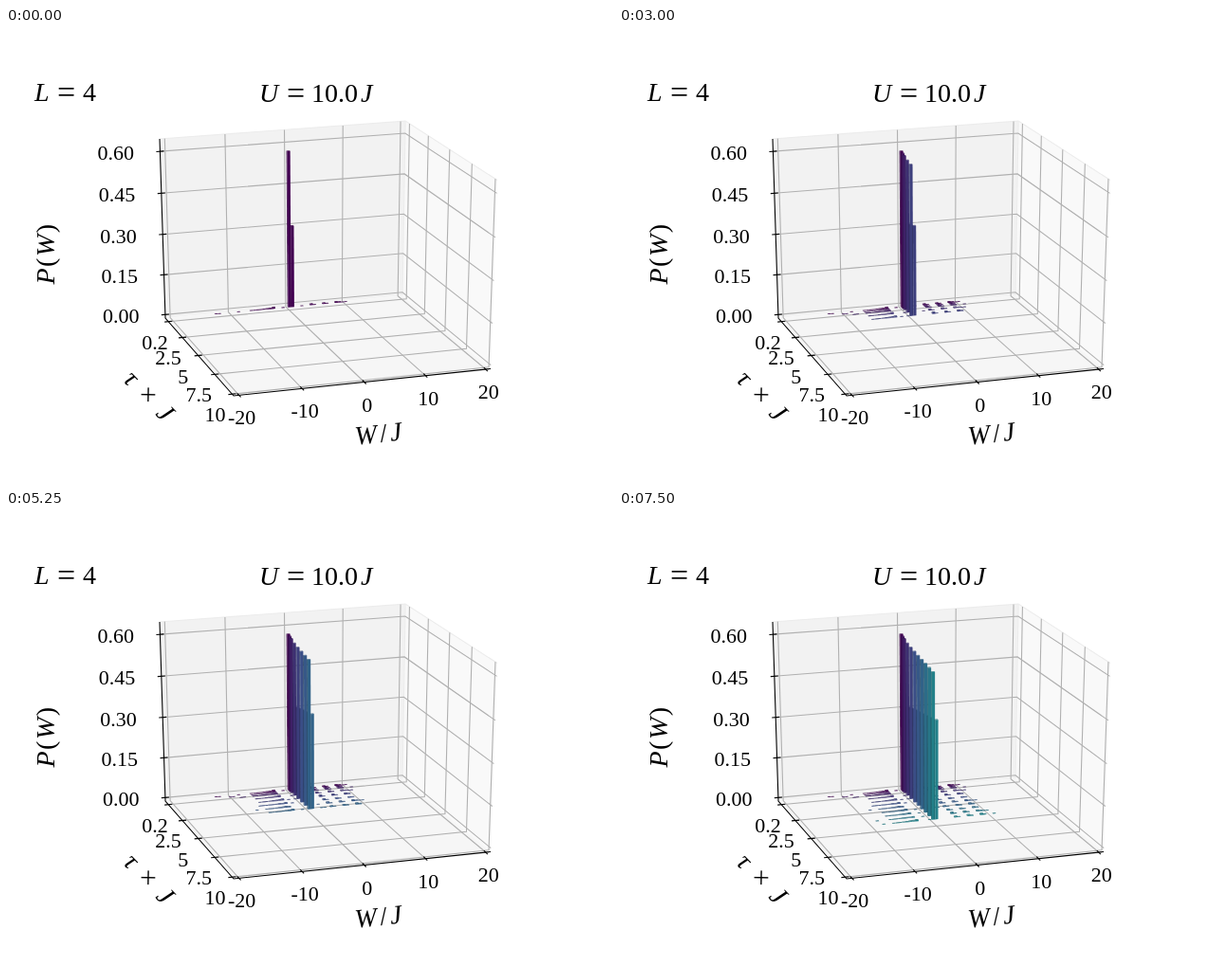
Recreate the animation shown at these times as an HTML page. Size 640x480 px, loop 8000 ms.

```html
<!DOCTYPE html>
<html lang="en">
<head>
<meta charset="utf-8">
<title>Work distribution</title>
<style>
html, body { margin: 0; width: 100%; height: 100%; overflow: hidden; background: #fff; }
svg { display: block; width: 100vw; height: 100vh; }
text { font-family: "Liberation Serif", serif; fill: #000; }
</style>
</head>
<body>
<svg id="stage" viewBox="0 0 640 480"></svg>
<script>
const STEP = 750, LOOP = 8000, ROWS = 11;
const BIN = .55, DEPTH = .1;
const stage = document.getElementById('stage');

// Box corners on screen with their perspective weights: origin, W end, tau end, P end
const CORNERS = [[168, 306, 1], [418, 282.3, 1.03], [240, 388, .912], [162, 117, .9646]];

// Unit box coordinates to screen
function project(u, v, w) {
  let x = 0, y = 0, sum = 0;
  [1 - u - v - w, u, v, w].forEach((part, i) => {
    const [cx, cy, scale] = CORNERS[i], a = part * scale;
    x += a * cx;
    y += a * cy;
    sum += a;
  });
  return [x / sum, y / sum];
}

// Data values to unit box coordinates
const atW = W => .5 + .024 * W;
const atTau = tau => .03 + .095 * tau;
const atP = P => .02 + 1.521 * P;
const plot = (W, tau, P) => project(atW(W), atTau(tau), atP(P));

function add(tag, attrs, parent = stage) {
  const el = document.createElementNS('http://www.w3.org/2000/svg', tag);
  for (const name in attrs) el.setAttribute(name, attrs[name]);
  parent.appendChild(el);
  return el;
}
const join = points => points.map(p => p.map(n => n.toFixed(2)).join()).join(' ');
const face = (fill, points, parent) => add('polygon', { points: join(points), fill }, parent);
const line = (stroke, ...points) =>
  add('polyline', { points: join(points), stroke, fill: 'none', 'stroke-width': 1.1 });
const box = (...corners) => corners.map(c => project(...c));

function label(str, x, y, { size = 22, anchor = 'middle', italic = false, turn = 0, gap = 0 } = {}) {
  const el = add('text', { x, y, 'font-size': size, 'text-anchor': anchor, 'letter-spacing': gap });
  if (italic) el.setAttribute('font-style', 'italic');
  if (turn) el.setAttribute('transform', `rotate(${turn} ${x} ${y})`);
  el.innerHTML = str;
}

function drawPanes() {
  face('#f2f2f2', box([0, 0, 0], [1, 0, 0], [1, 0, 1], [0, 0, 1]));
  face('#f9f9f9', box([1, 0, 0], [1, 1, 0], [1, 1, 1], [1, 0, 1]));
  face('#f6f6f6', box([0, 0, 0], [1, 0, 0], [1, 1, 0], [0, 1, 0]));
  line('#ececec', ...box([0, 0, 1], [1, 0, 1], [1, 1, 1]));
  line('#ececec', ...box([1, 0, 0], [1, 0, 1]));
}

function drawAxes() {
  const grid = '#b0b0b0', ink = '#000', marks = [];
  const tick = ([x, y], dx, dy) => marks.push([[x - dx, y - dy], [x + dx, y + dy]]);

  for (let W = -20; W <= 20; W += 10) {
    const u = atW(W), [x, y] = project(u, 1, 0);
    line(grid, ...box([u, 0, 1], [u, 0, 0], [u, 1, 0]));
    tick([x, y], 2, 2);
    label(W, x + 3, y + 31);
  }
  for (const tau of [.2, 2.5, 5, 7.5, 10]) {
    const v = atTau(tau), [x, y] = project(0, v, 0);
    line(grid, ...box([0, v, 0], [1, v, 0], [1, v, 1]));
    tick([x, y], 4, -.4);
    label(tau, x - 14 - 4 * v, y + 29);
  }
  for (let i = 0; i < 5; i++) {
    const P = i * .15, w = atP(P), [x, y] = project(0, 0, w);
    line(grid, ...box([0, 0, w], [1, 0, w], [1, 1, w]));
    tick([x, y], 4, -.3);
    label(P.toFixed(2), x - 27.5, y + 9, { anchor: 'end' });
  }
  line(ink, ...box([0, 0, 1], [0, 0, 0], [0, 1, 0], [1, 1, 0]));
  marks.forEach(ends => line(ink, ...ends));
}

function drawTitles() {
  const big = { size: 28, anchor: 'start' }, math = { ...big, italic: true };
  const equals = { ...big, size: 34 };
  label('L', 30, 77, math);
  label('=', 54, 79, equals);
  label('4', 81, 77, big);
  label('U', 267, 78, math);
  label('=', 296, 80, equals);
  label('10.0', 322, 78, big);
  label('J', 374, 78, math);
  const roman = s => `<tspan font-style="normal">${s}</tspan>`;
  const axis = { size: 28, italic: true };
  label(`P${roman('(')}W${roman(')')}`, 51, 238, { ...axis, gap: 1.5, turn: -90 });
  label(`W${roman('/')}J`, 395, 437, { ...axis, gap: 3, turn: -6 });
  label(`τ ${roman('×')} J`, 145, 395, { ...axis, gap: 2.5, turn: 46 });
}

// Dark violet through blue to teal
const SHADES = [[68, 1, 84], [60, 80, 139], [36, 132, 141]];
function tint(k, light) {
  const i = k < 5 ? 0 : 1, f = k / 5 - i;
  return `rgb(${SHADES[i].map((c, n) => Math.round((c + (SHADES[i + 1][n] - c) * f) * light))})`;
}

function drawBar(g, k, tau, W, P) {
  const right = W + BIN * .95, front = tau + DEPTH;
  face(tint(k, .75), [plot(W, tau, 0), plot(W, front, 0), plot(W, front, P), plot(W, tau, P)], g);
  face(tint(k, .85), [plot(W, tau, P), plot(right, tau, P), plot(right, front, P), plot(W, front, P)], g);
  face(tint(k, .97), [plot(W, front, 0), plot(right, front, 0), plot(right, front, P), plot(W, front, P)], g);
}

function randomFrom(seed) {
  return () => (seed = seed * 16807 % 2147483647) / 2147483647;
}

// Main peaks at W = 0, a ramp on the left, evenly spaced bumps on the right
function chance(n, W, tau, random) {
  const luck = random();
  if (n === 0) return .57 - .0082 * tau + .012 * Math.exp(-2 * tau * tau);
  if (n === 1) return .324 + .0085 * tau - .03 * Math.exp(-2 * tau);
  const reach = -9.5 - 10 * Math.exp(-5 * tau);
  if (W > -7.4 && W < -2.7) return .0004 + .007 * ((W + 7.4) / 4.7) ** 3 * (.4 + .6 * luck);
  if (W > 2.6 && W < 9) return .006 * Math.cos(2 * Math.PI * (W - 3.6) / 2.25) * (.6 + .4 * luck);
  return W > reach && W < 10.5 && luck < .25 ? .0003 : 0;
}

function drawRow(k) {
  const g = add('g', {}), random = randomFrom(977 + k * 131);
  const tau = Math.max(.2 + .2 * k, .5 * k - .5);
  for (let n = -25; n < 20; n++) {
    const W = n * BIN - .3, P = chance(n, W, tau, random);
    if (P > .0002) drawBar(g, k, tau, W, P);
  }
  return g;
}

drawPanes();
drawAxes();
const rows = Array.from({ length: ROWS }, (_, k) => drawRow(k));
drawTitles();

function render(t) {
  const last = Math.floor((t % LOOP) / STEP);
  rows.forEach((g, k) => g.setAttribute('visibility', k <= last ? 'visible' : 'hidden'));
}

const start = performance.now();
function frame() {
  render(performance.now() - start);
  requestAnimationFrame(frame);
}
frame();
</script>
</body>
</html>
```
